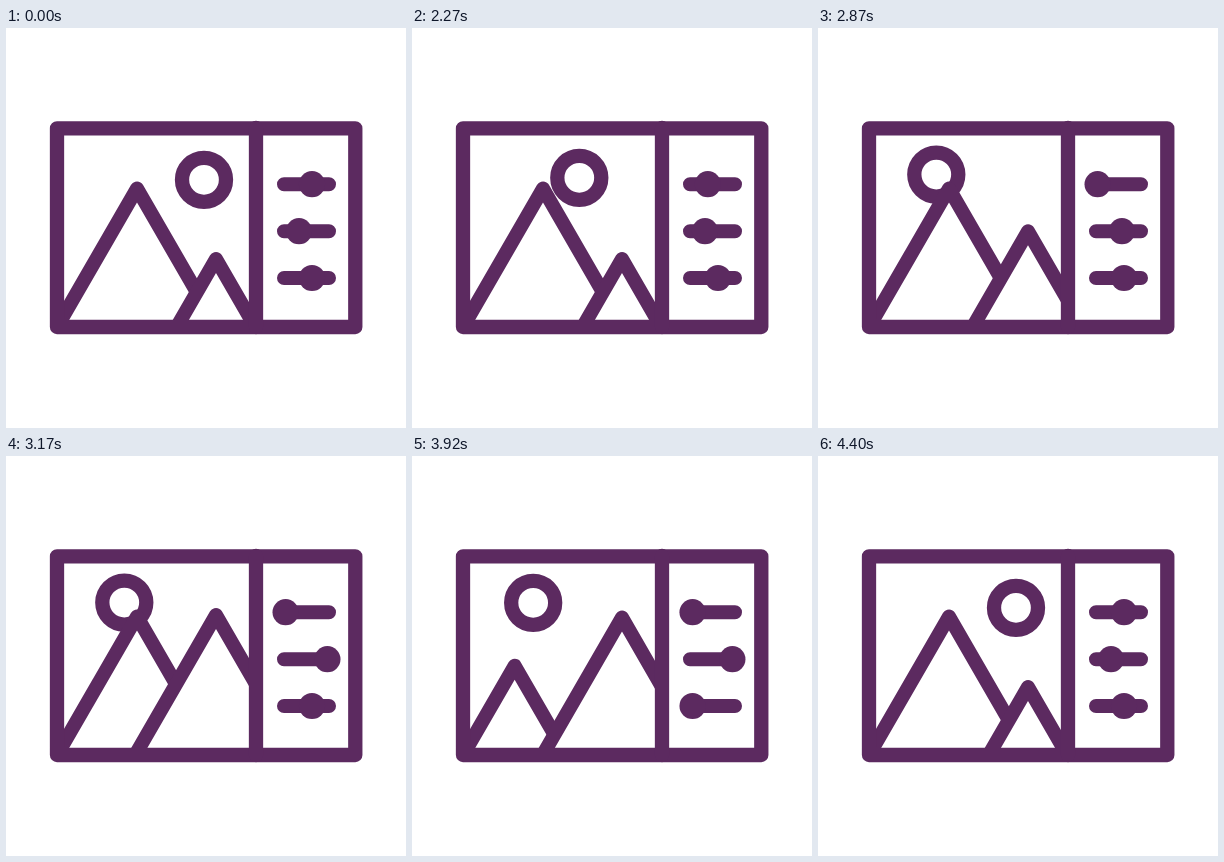
These frames come from a looping animation (400x400 px, 4460 ms). An HTML page:

```html
<!DOCTYPE html>
<html lang="en">
<head>
<meta charset="utf-8">
<title>Image settings icon</title>
<style>
  html, body { margin: 0; width: 100%; height: 100%; overflow: hidden; background: #fff; }
  svg { display: block; width: 100vw; height: 100vh; }
  .line { fill: none; stroke: #5c2a60; stroke-width: 14.3; stroke-linecap: round; stroke-linejoin: round; }
  .hill { fill: #fff; stroke-width: 14; }
  .knob { fill: #5c2a60; }
</style>
</head>
<body>
<svg viewBox="0 0 400 400">
  <defs>
    <clipPath id="view"><rect x="51" y="100" width="199" height="199"/></clipPath>
    <path id="peak" d="M-100 173.2 0 0 100 173.2"/>
  </defs>
  <g clip-path="url(#view)">
    <circle id="sun" class="line" r="22"/>
    <use id="hillA" class="line hill" href="#peak"/>
    <use id="hillB" class="line hill" href="#peak"/>
  </g>
  <rect class="line" x="51" y="100.3" width="298.3" height="198.7"/>
  <path class="line" d="M250 100V299"/>
  <path class="line" style="stroke-width:14" d="M278 156.2H323M278 203.2H323M278 250H323"/>
  <circle id="knobA" class="knob" r="13.1"/>
  <circle id="knobB" class="knob" r="13.1"/>
  <circle id="knobC" class="knob" r="13.1"/>
</svg>
<script>
  const LOOP = 4460, TICK = 30, STEP = 600, BEGIN = 1995;

  // Which move each part belongs to, with its resting and shifted position.
  const parts = [
    { id: 'sun',   move: 0, from: [198, 151.8],   to: [118.3, 146.6] },
    { id: 'knobA', move: 0, from: [306, 156.2],   to: [279.6, 156.2] },
    { id: 'hillB', move: 1, from: [210, 231],     to: [210, 159] },
    { id: 'knobB', move: 1, from: [293, 203.2],   to: [321.4, 203.2] },
    { id: 'hillA', move: 2, from: [131, 160.5],   to: [101.6, 211.5] },
    { id: 'knobC', move: 2, from: [306, 250],     to: [279.6, 250] }
  ].map(p => ({ ...p, el: document.getElementById(p.id) }));

  function ease(x) {
    x = Math.min(1, Math.max(0, x));
    return x < 0.5 ? 4 * x ** 3 : 1 - 4 * (1 - x) ** 3;
  }

  const progress = (t, move) => ease((t - BEGIN) / STEP - move);

  function draw(t) {
    const back = progress(t, 3);
    for (const { el, move, from, to } of parts) {
      const k = progress(t, move) - back;
      const [x, y] = from.map((v, i) => v + (to[i] - v) * k);
      el.setAttribute('transform', `translate(${x} ${y})`);
    }
  }

  const start = performance.now();

  function frame() {
    const t = (performance.now() - start) % LOOP;
    draw(t - (t + 10) % TICK); // motion advances in 30 ms ticks
    requestAnimationFrame(frame);
  }
  frame();
</script>
</body>
</html>
```
